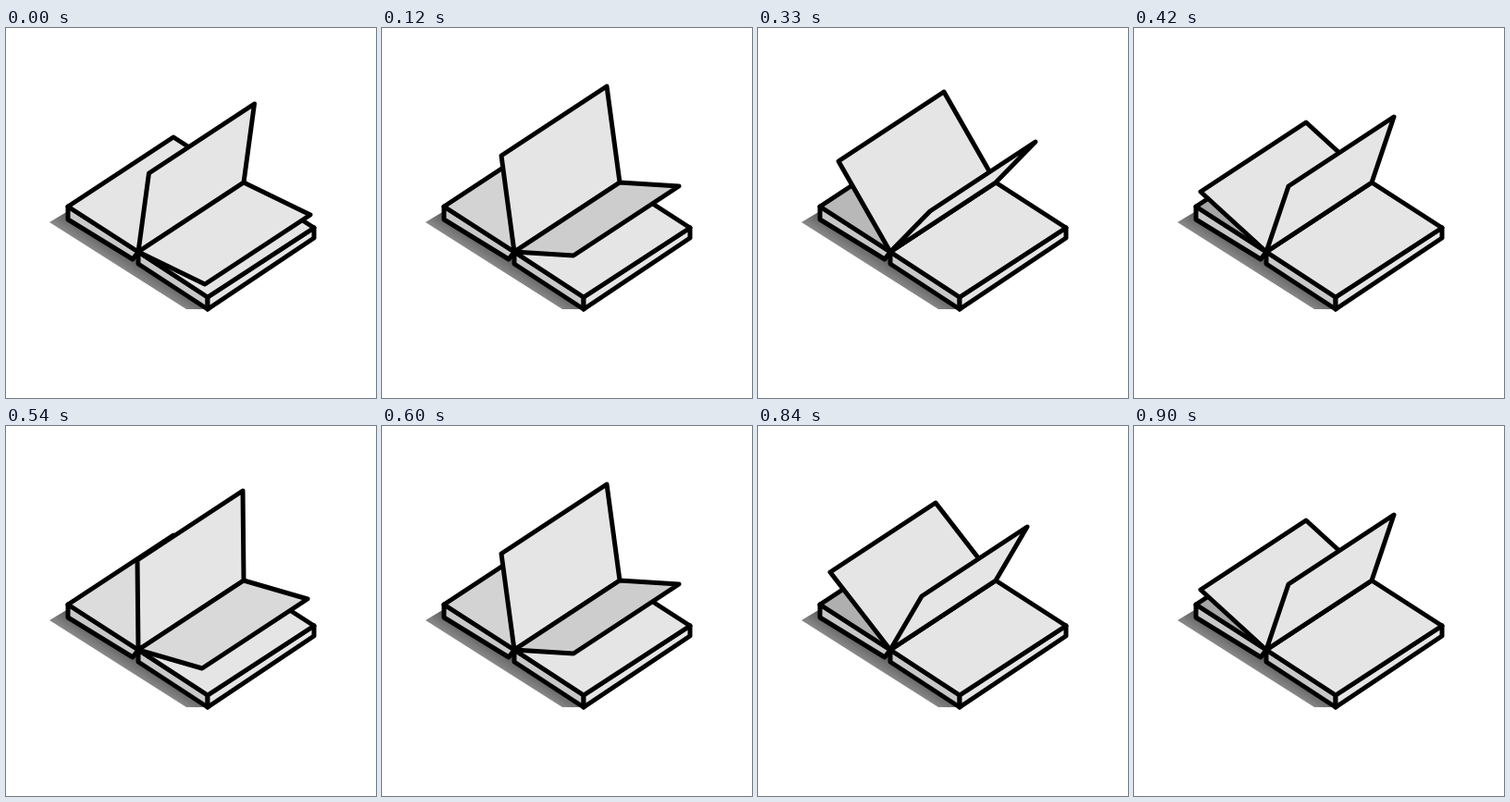
An HTML page with a canvas that plays this animation: 400x400 px, repeating every 0.96 s.

```html
<!DOCTYPE html>
<html>
<head>
<meta charset="utf-8">
<style>
html, body { margin: 0; width: 100%; height: 100%; overflow: hidden; background: #fff; }
canvas { display: block; }
</style>
</head>
<body>
<canvas id="stage" width="400" height="400"></canvas>
<script>
const ctx = document.getElementById('stage').getContext('2d');
const STEP = 60, CYCLE = 8;
const PAPER = 229, SIDE = 200;
const near = [143, 242], far = [257, 167];

// Outer edge of a turning page, relative to the hinge, one point per step.
const turn = [
  [72, 35], [69, 20], [64, 4], [58, -12], [51, -29], [43, -44], [34, -58], [24, -71],
  [11.5, -85], [-1, -97], [-14, -104], [-29, -107], [-44, -105], [-56, -98], [-65, -84], [-71, -65]
];

const gray = v => `rgb(${v},${v},${v})`;

function trace(points) {
  ctx.beginPath();
  points.forEach(p => ctx.lineTo(...p));
  ctx.closePath();
}

function face(shade, ...points) {
  trace(points);
  ctx.fillStyle = gray(shade);
  ctx.fill();
  ctx.stroke();
}

function page([dx, dy], shade) {
  const shift = ([x, y]) => [x + dx, y + dy];
  face(shade, near, far, shift(far), shift(near));
}

function drawShadow() {
  const fade = ctx.createLinearGradient(132, 240, 121, 257);
  fade.addColorStop(0, '#555');
  fade.addColorStop(1, '#888');
  trace([[47, 210], [67, 198], [143, 247], [218, 304], [195, 304]]);
  ctx.fillStyle = fade;
  ctx.fill();
}

function drawBook(leftShade) {
  face(SIDE, [67, 193], near, [137, 250], [67, 207]);
  face(SIDE, near, [218, 291], [218, 304], [143, 255]);
  face(PAPER, [218, 291], [333, 216], [333, 227], [218, 304]);
  face(leftShade, [67, 193], [181, 118], far, near);
  face(PAPER, near, far, [333, 216], [218, 291]);
}

function draw(time) {
  const step = Math.floor(time / STEP) % CYCLE;
  ctx.clearRect(0, 0, 400, 400);
  ctx.lineWidth = 5;
  ctx.lineJoin = 'round';
  drawShadow();
  drawBook(PAPER - 9 * step);
  page(turn[step + CYCLE], PAPER);
  // The upper side darkens until the page is seen edge-on.
  page(turn[step], step < 4 ? PAPER - 12 * step : PAPER);
}

function loop() {
  draw(performance.now() - start);
  requestAnimationFrame(loop);
}

const start = performance.now();
loop();
</script>
</body>
</html>
```
